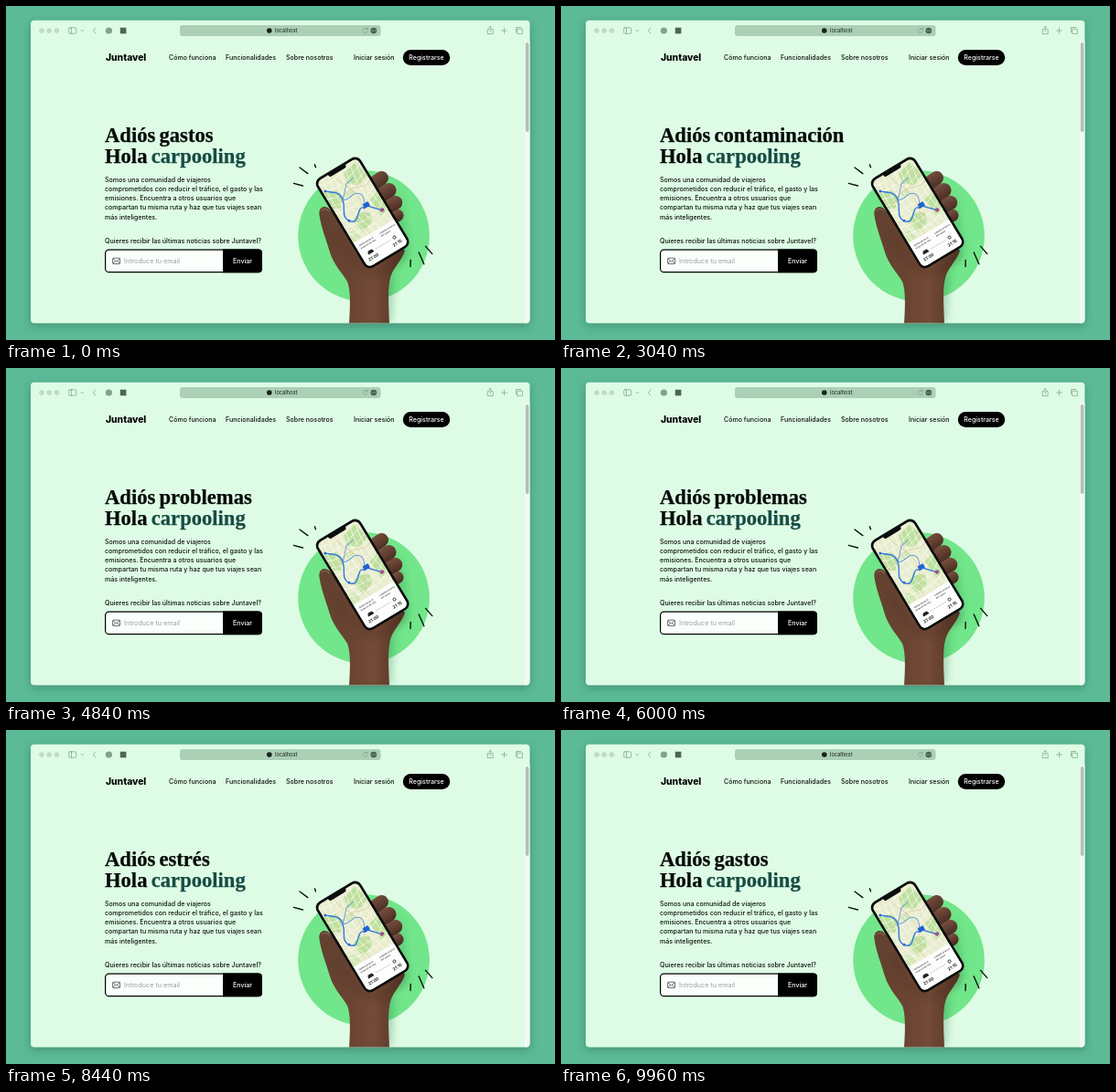
These frames come from a looping animation (600x366 px, 10000 ms). An HTML page:

```html
<!DOCTYPE html>
<html lang="es">
<head>
<meta charset="utf-8">
<title>Landing</title>
<style>
  html, body { margin: 0; width: 100%; height: 100%; overflow: hidden; background: #5cba97; }
  svg { display: block; width: 600px; height: 366px; }
  text { font: 500 7.07px Inter, sans-serif; fill: #0b100d; }
  .title text { font: bold 22.6px "Liberation Serif", serif; fill: #060b08; stroke: #060b08; stroke-width: .25; }
  .title .accent { fill: #174c45; stroke: #174c45; }
  .brand { font-size: 10.3px; font-weight: 800; fill: #000; }
  .light { fill: #fff; }
  .hint { fill: #9a9f9c; font-size: 7.2px; font-weight: 400; }
  .url { font-size: 5.6px; fill: #26352c; }
  .icons { fill: none; stroke: #7fa489; stroke-width: .75; stroke-linecap: round; stroke-linejoin: round; }
  .sparks { stroke: #0a0f0c; stroke-width: 1.4; stroke-linecap: round; }
  .tiny { font-size: 2.5px; fill: #333; }
  .hour { font-size: 4.7px; font-weight: 600; }
</style>
</head>
<body>
<svg viewBox="0 0 600 366">
  <defs>
    <linearGradient id="skin" x1="340" x2="436" y1="0" y2="0" gradientUnits="userSpaceOnUse">
      <stop offset="0" stop-color="#60402f"/>
      <stop offset=".38" stop-color="#6a4432"/>
      <stop offset=".65" stop-color="#734b37"/>
      <stop offset="1" stop-color="#503124"/>
    </linearGradient>
    <linearGradient id="finger" x1="0" x2="1" y1="0" y2="1">
      <stop offset="0" stop-color="#785040"/>
      <stop offset="1" stop-color="#4a2d22"/>
    </linearGradient>
    <clipPath id="page"><rect x="27" y="15.8" width="545.4" height="331.8" rx="4"/></clipPath>
    <clipPath id="screen"><rect x="-25.6" y="-54.8" width="51.2" height="109.6" rx="5.5"/></clipPath>
    <filter id="shadow" x="-10%" y="-10%" width="120%" height="125%">
      <feDropShadow dx="0" dy="3" stdDeviation="5" flood-color="#134b35" flood-opacity=".35"/>
    </filter>
    <filter id="soft" x="-30%" y="-30%" width="160%" height="160%"><feGaussianBlur stdDeviation="4"/></filter>
  </defs>

  <rect width="600" height="366" fill="#5cba97"/>
  <rect x="27" y="15.8" width="545.4" height="331.8" rx="4" fill="#defce5" filter="url(#shadow)"/>

  <!-- browser bar -->
  <g fill="#c3dbc9" stroke="#aecab6" stroke-width=".4">
    <circle cx="39" cy="27" r="2.5"/><circle cx="47.2" cy="27" r="2.5"/><circle cx="55.4" cy="27" r="2.5"/>
  </g>
  <rect x="190" y="21" width="219.5" height="12" rx="3" fill="#abd0b5"/>
  <g class="icons">
    <rect x="68.7" y="23.8" width="8" height="6.4" rx="1.2"/>
    <path d="M71.5 23.8v6.4M82 26.4l1.4 1.4 1.4-1.4M98 24l-2.7 3 2.7 3"/>
    <path d="M394.8 25.4a2.5 2.5 0 1 0 .4 2.2M395.2 23.8v1.9h-1.9"/>
    <path d="M527.8 25.6h-1.6v5h6v-5h-1.6M529.2 28v-5.4M527.6 24l1.6-1.6 1.6 1.6M541.6 27h5.8M544.5 24.1v5.8"/>
    <path d="M557.5 28.8v-5.3h5.3M559.2 25.2h5.2v5.2h-5.2z"/>
  </g>
  <circle cx="112.4" cy="27" r="3.6" fill="#7fa489"/>
  <rect x="124.8" y="23.7" width="6.6" height="6.6" fill="#4c6656"/>
  <circle cx="287.8" cy="27" r="2.8" fill="#17231c"/>
  <circle cx="401.8" cy="27" r="3.3" fill="#48614f"/>
  <path d="M400.2 27h3.6" stroke="#c9e3d0" stroke-width=".9" stroke-dasharray=".7 .7"/>
  <text class="url" x="294" y="29">localhost</text>

  <g clip-path="url(#page)">
    <rect x="567" y="38.5" width="6" height="310" fill="#f4f9f5"/>
    <rect x="567.8" y="40" width="3.6" height="98" rx="1.8" fill="#b5bdb8"/>
  </g>

  <!-- navigation -->
  <text class="brand" x="109" y="59.6">Juntavel</text>
  <text x="178" y="58.7">Cómo funciona</text>
  <text x="240" y="58.7">Funcionalidades</text>
  <text x="306" y="58.7">Sobre nosotros</text>
  <text x="380" y="58.7">Iniciar sesión</text>
  <rect x="433.8" y="48" width="51.4" height="17" rx="8.5"/>
  <text class="light" x="459.5" y="58.9" text-anchor="middle">Registrarse</text>

  <!-- heading -->
  <g class="title">
    <text x="108" y="148.6">Adiós</text>
    <g id="words"></g>
    <text x="108" y="171.6">Hola</text>
    <text class="accent" x="158.8" y="171.6">carpooling</text>
  </g>

  <g id="intro"></g>
  <text x="108" y="260.4">Quieres recibir las últimas noticias sobre Juntavel?</text>
  <rect x="108.6" y="267.1" width="170.8" height="24.6" rx="4" fill="#fbfffc" stroke="#000" stroke-width="1.2"/>
  <path d="M237 266.5h39a4 4 0 0 1 4 4v17.8a4 4 0 0 1-4 4h-39z"/>
  <g fill="none" stroke="#333" stroke-width=".7" stroke-linejoin="round">
    <rect x="116.6" y="276.2" width="8" height="6.4" rx="1"/>
    <path d="M116.9 276.8l3.7 3.2 3.7-3.2M116.9 282.2l2.6-2.9M124.3 282.2l-2.6-2.9"/>
  </g>
  <text class="hint" x="129" y="282">Introduce tu email</text>
  <text class="light" x="258.5" y="282" text-anchor="middle">Enviar</text>

  <!-- hand and phone -->
  <g clip-path="url(#page)">
    <circle cx="391" cy="252" r="71.8" fill="#72e68a"/>
    <path d="M412 300L440 272L430 200L421 347H412z" fill="#1f7040" opacity=".3" filter="url(#soft)"/>
    <g stroke="url(#finger)" stroke-linecap="round" fill="none">
      <path d="M416 236L427.5 229.5" stroke-width="14"/>
      <path d="M408 224L425.5 215.5" stroke-width="15.5"/>
      <path d="M402 212L418.5 202" stroke-width="16"/>
      <path d="M394 200L410.5 188.5" stroke-width="15"/>
    </g>
    <path d="M342.3 228C342 219 350 218 354 223L380 250L430 262L436 268C433 278 424 286 420.5 296C417 308 418 324 419 348H375C376 330 377 312 373 302C367 292 358 283 354 270C350 256 344 242 342.3 228z" fill="url(#skin)"/>
    <path d="M362 249C368 266 380 282 398 291C410 294 424 284 434 271" fill="none" stroke="#3b2219" stroke-width="4" opacity=".35" filter="url(#soft)"/>
    <path d="M345 224.5C347 221 351 222 353 225" fill="none" stroke="#8a5f4b" stroke-width="1.2" stroke-linecap="round"/>
    <g transform="translate(389.6 226.5) rotate(-31)">
      <rect x="-28.3" y="-57.5" width="56.6" height="115" rx="8" fill="#0b0d0e"/>
      <g clip-path="url(#screen)">
        <rect x="-26" y="-55" width="52" height="110" fill="#e9edcf"/>
        <g transform="scale(1.14 1.03)">
          <g fill="#bfe0a0">
            <path d="M-23-40l12 5 4 11-9 8-7-4zM4-46l15-4 4 18-12 5-9-8zM-12 2l9-5 9 7-2 9-13 5zM12-8l11-3v22l-9 2z"/>
            <path d="M-23 10l8 2 2 9-10 3zM-5-27l7-2 3 7-8 2z" fill="#d2e7b5"/>
          </g>
          <g id="roads" fill="none" stroke="#fbfcf4" stroke-width=".6"></g>
          <path d="M-23-22C-13-17-9-30 2-28S14-20 23-26M-4-54C-8-38 8-30 4-8S-8 12-4 24" fill="none" stroke="#dcc795" stroke-width=".6"/>
          <path d="M-20-40C-14-34-8-32-10-22S-20-8-15 0S-6 0-1-4S3 0 7-4L17 8" fill="none" stroke="#3478dc" stroke-width="1.3" stroke-linecap="round"/>
          <path d="M-10-22C-3-18 2-25 7-19S3-7 7-4M-10-22L1-35L10-37" fill="none" stroke="#5b95e2" stroke-width=".8"/>
          <rect x="4" y="-7.5" width="6" height="5" rx=".8" fill="#1f64d4"/>
          <circle cx="17.5" cy="8.2" r="2" fill="#a24f87"/>
          <circle cx="-20" cy="-40" r="1.3" fill="#2468ce"/>
          <circle cx="-15" cy="0" r="1.3" fill="#2468ce"/>
        </g>
        <rect x="-26" y="24" width="52" height="32" fill="#fcfdfc"/>
        <text class="tiny" x="-22" y="30">Salida desde la</text>
        <text class="tiny" x="-22" y="33.5">estación de tren</text>
        <text class="tiny" x="4" y="30">Llegada al barrio</text>
        <text class="tiny" x="4" y="33.5">del centro</text>
        <path d="M-18 41.5h7l-1.2-2.2h-4.4zM-18 41.5h7v1.4h-7z" fill="#222"/>
        <path d="M-8 41.5H11" stroke="#8b918e" stroke-width=".6" stroke-dasharray="1.2 1"/>
        <circle cx="16" cy="41.2" r="1.6" fill="none" stroke="#222" stroke-width=".8"/>
        <text class="hour" x="-14.6" y="49.6" text-anchor="middle">21:00</text>
        <text class="hour" x="15.6" y="49.6" text-anchor="middle">21:15</text>
      </g>
      <path d="M-11-55.5h22v1.2a2.6 2.6 0 0 1-2.6 2.6h-16.8a2.6 2.6 0 0 1-2.6-2.6z" fill="#0b0d0e"/>
    </g>
    <path class="sparks" d="M321 177l8.8 6.6M314.5 194.3l9.8 2.7M337.4 173.8l1 3M458.6 263.4l7.2 8.2M451.2 270l5.6 12.8M442.2 278.5l-.2 7"/>
  </g>
</svg>

<script>
  const LOOP = 10000, HOLD = 2500, FIRST_SWAP = 1030, TRAVEL = 20, BASE = 148.6;
  const NS = 'http://www.w3.org/2000/svg';

  function add(parent, tag, attrs, content = '') {
    const el = document.createElementNS(NS, tag);
    for (const key in attrs) el.setAttribute(key, attrs[key]);
    el.textContent = content;
    return document.getElementById(parent).appendChild(el);
  }

  [
    'Somos una comunidad de viajeros',
    'comprometidos con reducir el tráfico, el gasto y las',
    'emisiones. Encuentra a otros usuarios que',
    'compartan tu misma ruta y haz que tus viajes sean',
    'más inteligentes.'
  ].forEach((line, i) => add('intro', 'text', { x: 108, y: 193 + i * 10.15 }, line));

  for (let i = 0; i < 9; i++) {
    const y = -50 + i * 9, x = -22 + i * 6;
    add('roads', 'path', { d: `M-23 ${y}Q${i * 4 - 15} ${y + 10} 23 ${y - 5}M${x}-54Q${x - 9}-16 ${x + 5} 24` });
  }

  const words = ['gastos', 'contaminación', 'problemas', 'estrés']
    .map(word => add('words', 'text', { x: 167.5 }, word));

  // Overdamped spring from 0 to 1, time in seconds.
  const spring = s => 1 - 1.1 * Math.exp(-5.1 * s) + 0.1 * Math.exp(-55 * s);

  function draw(now) {
    words.forEach((el, i) => {
      const enter = FIRST_SWAP + (i - 1) * HOLD;
      const age = (now % LOOP - enter + LOOP) % LOOP;
      const leaving = age >= HOLD;
      const p = spring((leaving ? age - HOLD : age) / 1000);
      el.setAttribute('y', BASE + TRAVEL * (leaving ? -p : 1 - p));
      el.setAttribute('opacity', leaving ? 1 - p : p);
    });
  }

  function tick() {
    draw(performance.now());
    requestAnimationFrame(tick);
  }
  tick();
</script>
</body>
</html>
```
